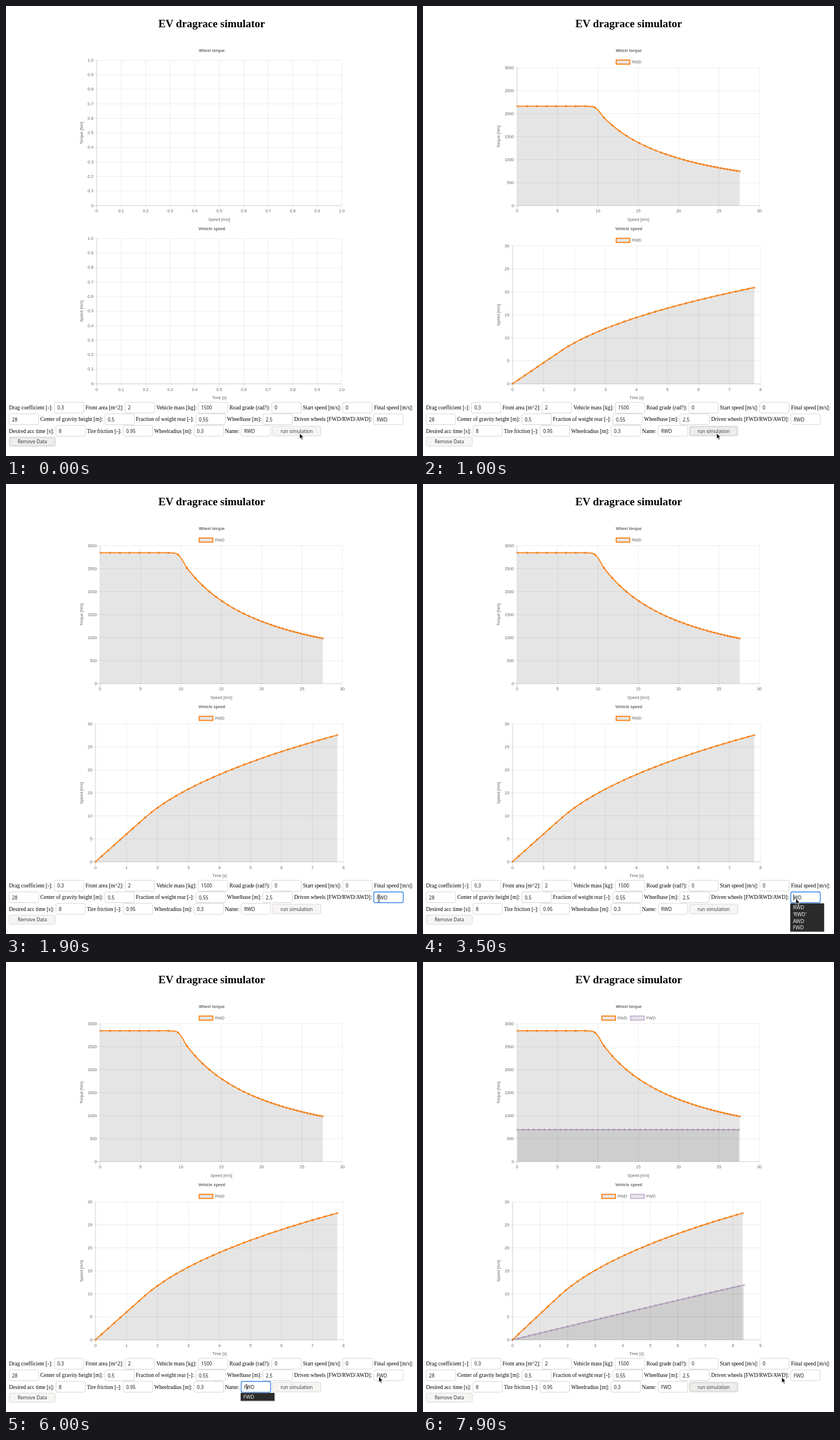
An HTML page that plays this animation: 716 px wide and 783 px high, repeating every 8000 ms.

```html
<!DOCTYPE html>
<html lang="en">
<head>
<meta charset="utf-8">
<title>EV dragrace simulator</title>
<style>
html, body { margin: 0; width: 100%; height: 100%; overflow: hidden; background: #fff; }
svg { display: block; }
text { white-space: pre; }
.h1 { font: bold 18.95px "Liberation Serif", serif; text-anchor: middle; }
.label { font: 9.45px "Liberation Serif", serif; }
.ui { font: 8.3px "Noto Sans", sans-serif; fill: #1c1f20; }
.btn { font-size: 8.2px; fill: #3a3f41; text-anchor: middle; }
.item { font-size: 8.7px; fill: #eee; }
.chart { font: 7.1px "Liberation Sans", sans-serif; fill: #666; }
.mid { text-anchor: middle; }
.end { text-anchor: end; }
.bold { font-weight: bold; }
</style>
</head>
<body>
<svg id="stage" width="716" height="783" viewBox="0 0 716 783">
  <text class="h1" x="358.3" y="36.8">EV dragrace simulator</text>
  <g id="charts" class="chart"></g>
  <g id="form"></g>
  <g id="pointer"></g>
</svg>
<script>
const LOOP = 8000, STEP = 100;
const ORANGE = '#ff7f0e', LILAC = '#c5b0d5', BASE = 347.3;
const $ = id => document.getElementById(id);
const mix = (a, b, k) => a + (b - a) * k;
const outQuart = p => 1 - (1 - Math.min(1, Math.max(0, p))) ** 4;

const text = (x, y, s, cls = '', extra = '') =>
  `<text x="${x}" y="${y}" class="${cls}" ${extra}>${s}</text>`;
const rect = (x, y, w, h, attrs) =>
  `<rect x="${x}" y="${y}" width="${w}" height="${h}" ${attrs}/>`;
const line = (x1, y1, x2, y2, alpha) =>
  `<path d="M${x1} ${y1}L${x2} ${y2}" stroke="#000" stroke-opacity="${alpha}" stroke-width=".75"/>`;

// Vehicle model: torque limited by grip, then by power.
function simulate(maxTorque, power, seconds) {
  const run = [], sub = 20, dt = 0.2 / sub;
  let v = 0.05;
  for (let i = 0; i <= Math.round(seconds * 5); i++) {
    run.push({ t: i / 5, v, torque: Math.min(maxTorque, power / v) });
    for (let n = 0; n < sub; n++) {
      v += dt * (0.0021466 * Math.min(maxTorque, power / v) - 0.1 - 0.00024 * v * v);
    }
  }
  return run;
}
const rwd = simulate(2845, 27070, 7.8);
const fwd = simulate(1595, Infinity, 8.4);

const CHARTS = [
  { dy: 0, title: 'Wheel torque', xName: 'Speed [m/s]', yName: 'Torque [Nm]',
    left: 164, right: 586, yMax: 3000, yStep: 500, xMax: [30, 30], xStep: 5,
    get: p => [p.v, p.torque] },
  { dy: 310.2, title: 'Vehicle speed', xName: 'Time [s]', yName: 'Speed [m/s]',
    left: 156, right: 588, yMax: 30, yStep: 5, xMax: [8, 9], xStep: 1,
    get: p => [p.t, p.v] }
];

// Smooth curve with tension 0.4; each knot is [x, y, inX, inY, outX, outY].
function spline(pts) {
  return pts.map((p, i) => {
    const a = pts[i - 1] || p, b = pts[i + 1] || p;
    const da = Math.hypot(p[0] - a[0], p[1] - a[1]);
    const db = Math.hypot(b[0] - p[0], b[1] - p[1]);
    const ka = 0.4 * da / (da + db), kb = 0.4 * db / (da + db);
    const dx = b[0] - a[0], dy = b[1] - a[1];
    return [...p, p[0] - ka * dx, p[1] - ka * dy, p[0] + kb * dx, p[1] + kb * dy];
  });
}

function knots(c, run, xMax) {
  return spline(run.map(p => {
    const [x, y] = c.get(p);
    return [c.left + x / xMax * (c.right - c.left), BASE - y / c.yMax * 240];
  }));
}

const blend = (from, to, k) => from.map((p, i) => p.map((n, j) => mix(n, to[i][j], k)));
const flat = ks => ks.map(p => p.map((n, j) => j % 2 ? BASE : n));

function curve(ks, color) {
  const f = n => n.toFixed(2);
  let d = `M${f(ks[0][0])} ${f(ks[0][1])}`, dots = '';
  ks.forEach((p, i) => {
    if (i) {
      const q = ks[i - 1];
      d += `C${[q[4], q[5], p[2], p[3], p[0], p[1]].map(f).join(' ')}`;
    }
    dots += `<circle cx="${f(p[0])}" cy="${f(p[1])}" r="1.7"/>`;
  });
  const last = ks[ks.length - 1];
  return `<path d="${d}L${f(last[0])} ${BASE}L${f(ks[0][0])} ${BASE}Z" fill="#000" fill-opacity=".1"/>` +
    `<path d="${d}" fill="none" stroke="${color}" stroke-width="1.8"/>` +
    `<g fill="#000" fill-opacity=".1" stroke="${color}" stroke-width=".6">${dots}</g>`;
}

const legend = (x, name, color) =>
  rect(x, 94.1, 23.7, 7.1, `fill="#000" fill-opacity=".1" stroke="${color}" stroke-width="1.8"`) +
  text(x + 27.3, 99.8, name);

function axes(c, left, right, top, xs, ys) {
  let s = '';
  const mid = (left + right) / 2, vMid = (top + BASE) / 2;
  xs.forEach((label, i) => {
    const x = mix(left, right, i / (xs.length - 1));
    s += line(x, top, x, BASE + 6, i ? 0.1 : 0.25) + text(x, 359.4, label, 'mid');
  });
  ys.forEach((label, i) => {
    const y = mix(BASE, top, i / (ys.length - 1));
    s += line(left - 6, y, right, y, i ? 0.1 : 0.25) + text(left - 5.8, y + 2.2, label, 'end');
  });
  return s + text(mid, 373.9, c.xName, 'mid') +
    text(0, 0, c.yName, 'mid', `transform="translate(134 ${vMid}) rotate(-90)"`);
}

const range = (max, step) => Array.from({ length: Math.round(max / step) + 1 }, (_, i) => i * step);
const tenths = range(10, 1).map(i => i ? (i / 10).toFixed(1) : '0');

function drawChart(c, t) {
  const stage = t < 700 ? 0 : t < 7600 ? 1 : 2;
  let s = text(358.5, 80, c.title, 'mid bold');
  if (!stage) {
    s += axes(c, 158, 585, 94.5, tenths, tenths);
  } else {
    const max = c.xMax[stage - 1];
    s += axes(c, c.left, c.right, BASE - 240, range(max, c.xStep), range(c.yMax, c.yStep));
    const first = knots(c, rwd, c.xMax[0]);
    if (stage === 1) {
      s += legend(336.6, 'RWD', ORANGE) +
        curve(blend(flat(first), first, outQuart((t - 700) / 1000)), ORANGE);
    } else {
      const k = outQuart((t - 7767) / 1000);
      const second = knots(c, fwd, max);
      s += legend(311.6, 'RWD', ORANGE) + legend(361.6, 'FWD', LILAC) +
        curve(blend(flat(second), second, k), LILAC) +
        curve(blend(first, knots(c, rwd, max), k), ORANGE);
    }
  }
  return `<g transform="translate(0 ${c.dy})">${s}</g>`;
}

const LABELS = [
  [[5.3, 'Drag coefficient [-]:'], [138.4, 'Front area [m^2]:'], [261.9, 'Vehicle mass [kg]:'],
   [389.3, 'Road grade (rad?):'], [517.3, 'Start speed [m/s]:'], [641.2, 'Final speed [m/s]:']],
  [[59.8, 'Center of gravity height [m]:'], [226.3, 'Fraction of weight rear [-]:'],
   [385, 'Wheelbase [m]:'], [502, 'Driven wheels [FWD/RWD/AWD]:']],
  [[5.3, 'Desired acc time [s]:'], [141, 'Tire friction [-]:'], [258.2, 'Wheelradius [m]:'], [381.4, 'Name:']]
];
const FIELDS = [
  [[84.4, '0.3'], [207.5, '2'], [335, '1500'], [463, '0'], [586.7, '0']],
  [[5.5, '28'], [172.3, '0.5'], [331, '0.55'], [447.5, '2.5'], [640.7, 'RWD', 'wheels']],
  [[87, '8', 'acc'], [204.2, '0.95', 'tire'], [327.5, '0.3', 'radius'], [409.7, 'RWD', 'name']]
];
const rowTop = r => 689.6 + r * 20.1;
const OPTIONS = ['RWD', "'RWD'", 'AWD', 'FWD'];

// Form changes over time, each merged onto the ones before.
const EVENTS = [
  [0, { focus: 'remove', wheels: 'RWD', name: 'RWD', caret: -1, sel: false, list: 0 }],
  [500, { focus: 'run' }],
  [1800, { focus: 'wheels' }],
  [2800, { wheels: 'WD', caret: 0, list: 4 }],
  [3000, { wheels: 'fWD', caret: 1 }],
  [3100, { list: 1 }],
  [3500, { wheels: 'WD', caret: 0, list: 4 }],
  [3800, { wheels: 'FWD', caret: 1 }],
  [3900, { list: 1 }],
  [4100, { focus: 'acc', caret: -1, sel: true, list: 0 }],
  [4400, { focus: 'tire' }],
  [4600, { focus: 'radius' }],
  [4800, { focus: 'name' }],
  [5300, { sel: false, caret: 0 }],
  [5600, { name: 'WD' }],
  [5700, { list: 4 }],
  [5900, { name: 'FWD', caret: 1 }],
  [6000, { list: 1 }],
  [7300, { focus: 'run', caret: -1, list: 0 }]
];
const stateAt = t => Object.assign({}, ...EVENTS.filter(e => e[0] <= t).map(e => e[1]));

function field(x, y, value, focused, st) {
  let s = rect(x, y, 51.3, 18.8, `rx="2.6" fill="#fff" stroke="${focused ? '#3584e4' : '#cfcbc8'}" ` +
    `stroke-width="${focused ? 1.4 : 0.8}"`);
  const marked = focused && st.sel;
  if (marked) s += rect(x + 4.6, y + 4.2, value.length * 4.9 + (value === 'RWD' ? 6 : 0), 11, 'fill="#3584e4"');
  s += text(x + 5, y + 12.8, value, 'ui', marked ? 'style="fill:#fff"' : '');
  if (focused && st.caret >= 0) s += rect(x + 4.7 + st.caret * 4.6, y + 4.2, 0.8, 11, 'fill="#000"');
  return s;
}

function button(x, y, w, h, label, focused) {
  let s = rect(x, y, w, h, `rx="2.6" fill="${focused ? '#efeeed' : '#f6f5f4'}" ` +
    `stroke="${focused ? '#c6c2bf' : '#d5d1ce'}" stroke-width=".8"`);
  if (focused) s += rect(x + 2, y + 2, w - 4, h - 4,
    'rx="1.5" fill="none" stroke="#b5b2b0" stroke-width=".6" stroke-dasharray="1 1"');
  return s + text(x + w / 2, y + h / 2 + 3.1, label, 'ui btn');
}

function menu(x, y, items) {
  return rect(x - 0.2, y + 0.8, 59.4, items.length * 11.8 + 2.6, 'fill="#000" fill-opacity=".15"') +
    rect(x, y, 59, items.length * 11.8 + 2, 'fill="#2b2b2b"') +
    items.map((s, i) => text(x + 4.6, y + 10.4 + i * 11.8, s, 'ui item')).join('');
}

function drawForm(t) {
  const st = stateAt(t);
  let s = '', open = '';
  FIELDS.forEach((row, r) => {
    const y = rowTop(r);
    s += LABELS[r].map(([x, label]) => text(x, y + 12.7, label, 'label')).join('');
    for (const [x, value, id] of row) {
      const focused = id === st.focus;
      s += field(x, y, st[id] || value, focused, st);
      if (focused && st.list) open = menu(x - 0.9, y + 19.9, OPTIONS.slice(-st.list));
    }
  });
  return s + button(464, 731.2, 84.5, 16.8, 'run simulation', st.focus === 'run') +
    button(5.6, 750, 80.3, 16, 'Remove Data', st.focus === 'remove') + open;
}

const PATH = [
  [0, 511.6, 743.6], [1000, 511.6, 743.6], [1200, 549, 737.6], [1500, 646, 730.5], [1600, 649.6, 721.6],
  [6500, 649.6, 721.6], [7200, 528, 743], [7400, 520, 746], [7600, 520, 746], [7900, 625, 722.6], [LOOP, 625, 722.6]
];
const ARROW = '<path d="M0 0V9.6L2.2 7.5L3.9 11.2L5.5 10.5L3.8 6.9H6.9Z" fill="#000" stroke="#fff" stroke-width=".7"/>';
const BEAM = '<path d="M-2-6.4Q0-6.4 0-5V5Q0 6.4-2 6.4M2-6.4Q0-6.4 0-5M0 5Q0 6.4 2 6.4" ' +
  'transform="translate(0 -1)" fill="none" stroke="#222" stroke-width=".9"/>';

function drawPointer(t) {
  const i = PATH.findIndex(p => p[0] > t), a = PATH[i - 1], b = PATH[i];
  const k = (t - a[0]) / (b[0] - a[0]);
  const beam = (t >= 1600 && t < 2800) || (t >= 4100 && t < 5600);
  return `<g transform="translate(${mix(a[1], b[1], k)} ${mix(a[2], b[2], k)})">${beam ? BEAM : ARROW}</g>`;
}

let shown = -1;
function frame() {
  const t = Math.floor(performance.now() % LOOP / STEP) * STEP;
  if (t !== shown) {
    shown = t;
    $('charts').innerHTML = CHARTS.map(c => drawChart(c, t)).join('');
    $('form').innerHTML = drawForm(t);
    $('pointer').innerHTML = drawPointer(t);
  }
  requestAnimationFrame(frame);
}
frame();
</script>
</body>
</html>
```
